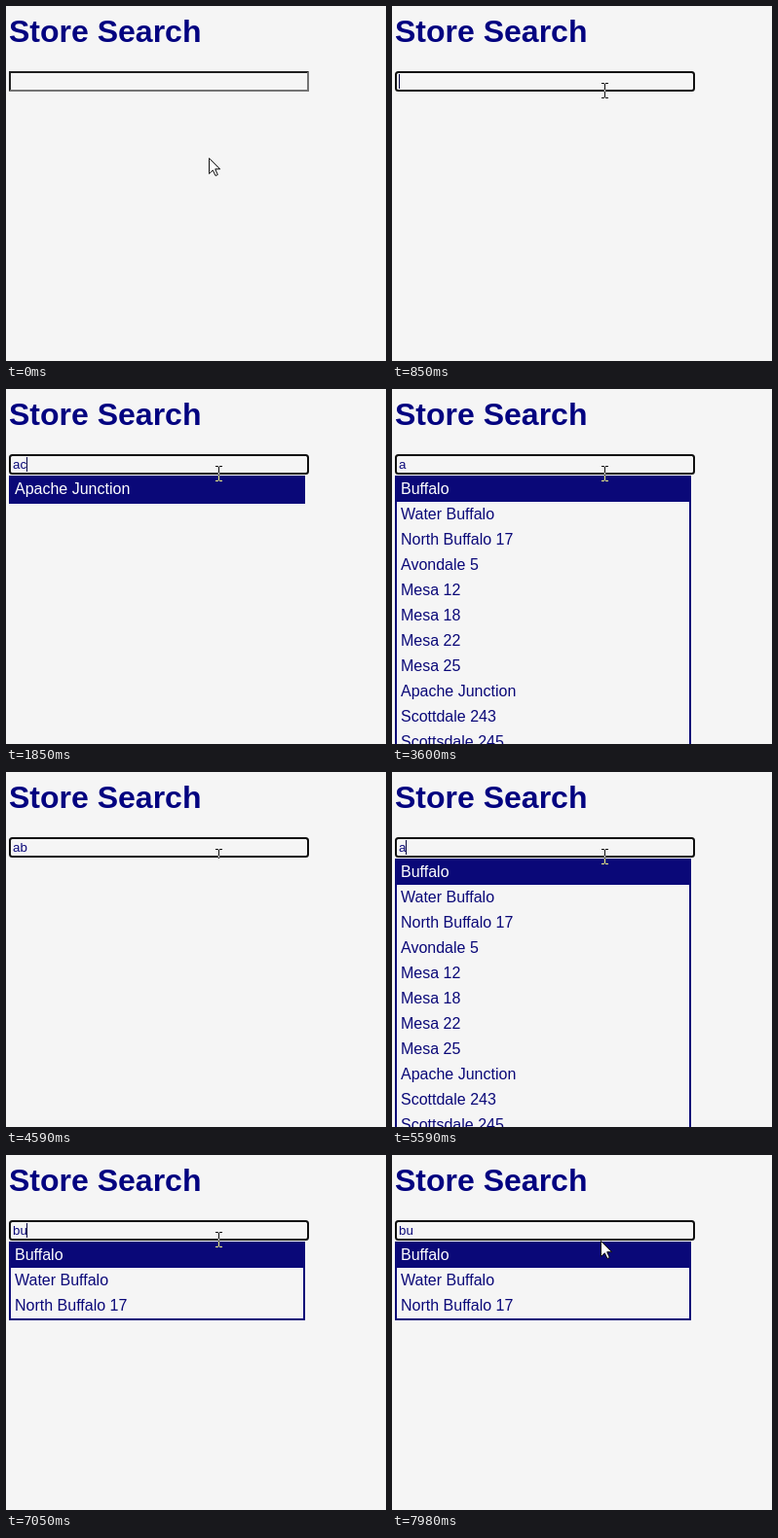
An HTML page that plays this animation: 390 by 365 pixels, repeating every 8 s.

```html
<!DOCTYPE html>
<html lang="en">
<head>
<meta charset="utf-8">
<title>Store Search</title>
<style>
  html, body { margin: 0; width: 100%; height: 100%; overflow: hidden; background: #f5f5f5; }
  svg { display: block; }
  text { font-family: "Liberation Sans", Arial, sans-serif; fill: #0a0878; white-space: pre; }
  #title { font-size: 32px; font-weight: bold; fill: #030380; }
  #query { font-size: 13.333px; }
  #list text { font-size: 16px; }
  #list text.active { fill: #fff; }
  #beam { mix-blend-mode: difference; }
</style>
</head>
<body>
<svg width="390" height="365" viewBox="0 0 390 365">
  <rect width="390" height="365" fill="#f5f5f5"/>
  <text id="title" x="3" y="37">Store Search</text>
  <g id="idle">
    <path d="M311 67V88H3L5 86H309V69Z" fill="#747474"/>
    <path d="M3 88V67H311L309 69H5V86Z" fill="#202020"/>
  </g>
  <rect id="focus" x="4" y="68" width="306" height="19" rx="2.5" fill="none" stroke="#101010" stroke-width="2"/>
  <text id="query" x="7" y="82"></text>
  <rect id="caret" y="70" width="1" height="15" fill="#060640"/>
  <g id="list"></g>
  <path id="beam" fill="#fff" shape-rendering="crispEdges"/>
  <path id="arrow" d="M.5 .5V16.5L4.3 12.8L7 18.5L9.3 17.5L6.7 11.7H11.7Z" fill="#fff" stroke="#101010"/>
</svg>
<script>
const LOOP = 8000;
const NAVY = "#0a0878";
const stores = ["Buffalo", "Water Buffalo", "North Buffalo 17", "Avondale 5", "Mesa 12", "Mesa 18",
  "Mesa 22", "Mesa 25", "Apache Junction", "Scottdale 243", "Scottsdale 245", "Gilbert 9"];

// time, typed text, caret visible
const typing = [
  [0, "", 0], [720, "", 1], [1050, "a", 1], [1580, "a", 0], [1850, "ac", 1], [2380, "ac", 0],
  [2910, "ac", 1], [3460, "ac", 0], [3600, "a", 0], [3990, "a", 1], [4060, "ab", 1],
  [4590, "ab", 0], [5120, "ab", 1], [5590, "a", 1], [5650, "a", 0], [5780, "", 0],
  [6180, "", 1], [6640, "", 0], [6850, "b", 1], [7050, "bu", 1], [7580, "bu", 0]
];

// time, x, y of the arrow tip
const moves = [
  [0, 208, 156], [70, 207, 152], [130, 205, 142], [190, 204, 129], [250, 206, 115],
  [320, 209, 102], [380, 212, 93], [440, 214, 88], [7980, 214, 88]
];

const $ = id => document.getElementById(id);
const at = (table, t) => table.findLast(row => row[0] <= t);
const show = (id, on) => $(id).setAttribute("visibility", on ? "visible" : "hidden");

function matches(query) {
  return query ? stores.filter(s => s.toLowerCase().includes(query)) : [];
}

function listMarkup(items) {
  if (!items.length) return "";
  const h = items.length * 26 + 3;
  const inner = items.length > 1
    ? `<rect x="5" y="116" width="300" height="${h - 29}" fill="#f5f5f5"/>` : "";
  const rows = items.map((s, i) =>
    `<text x="9" y="${108 + i * 26}"${i ? "" : ' class="active"'}>${s}</text>`);
  return `<rect x="3" y="89" width="304" height="${h}" fill="${NAVY}"/>` + inner + rows.join("");
}

const beamTop = "M215 79h3v1h-3zM219 79h3v1h-3zM218 80h1v";
const beamFull = beamTop + "14h-1zM215 94h3v1h-3zM219 94h3v1h-3z";
const beamCut = beamTop + "9h-1z";

let shown = null;
function draw(t) {
  const [, query, caret] = at(typing, t);
  const [, x, y] = at(moves, t);
  if (query !== shown) {
    shown = query;
    $("query").textContent = query;
    $("list").innerHTML = listMarkup(matches(query));
  }
  const focused = t >= 720;
  show("idle", !focused);
  show("focus", focused);
  show("caret", caret);
  $("caret").setAttribute("x", 7 + query.length * 7);

  const beam = t >= 590 && t < 7980;
  const cut = t > 4000 && !matches(query).length;
  show("beam", beam);
  show("arrow", !beam);
  $("beam").setAttribute("d", cut ? beamCut : beamFull);
  $("arrow").setAttribute("transform", `translate(${x} ${y})`);
}

const start = performance.now();
function tick() {
  draw((performance.now() - start) % LOOP);
  requestAnimationFrame(tick);
}
tick();
</script>
</body>
</html>
```
